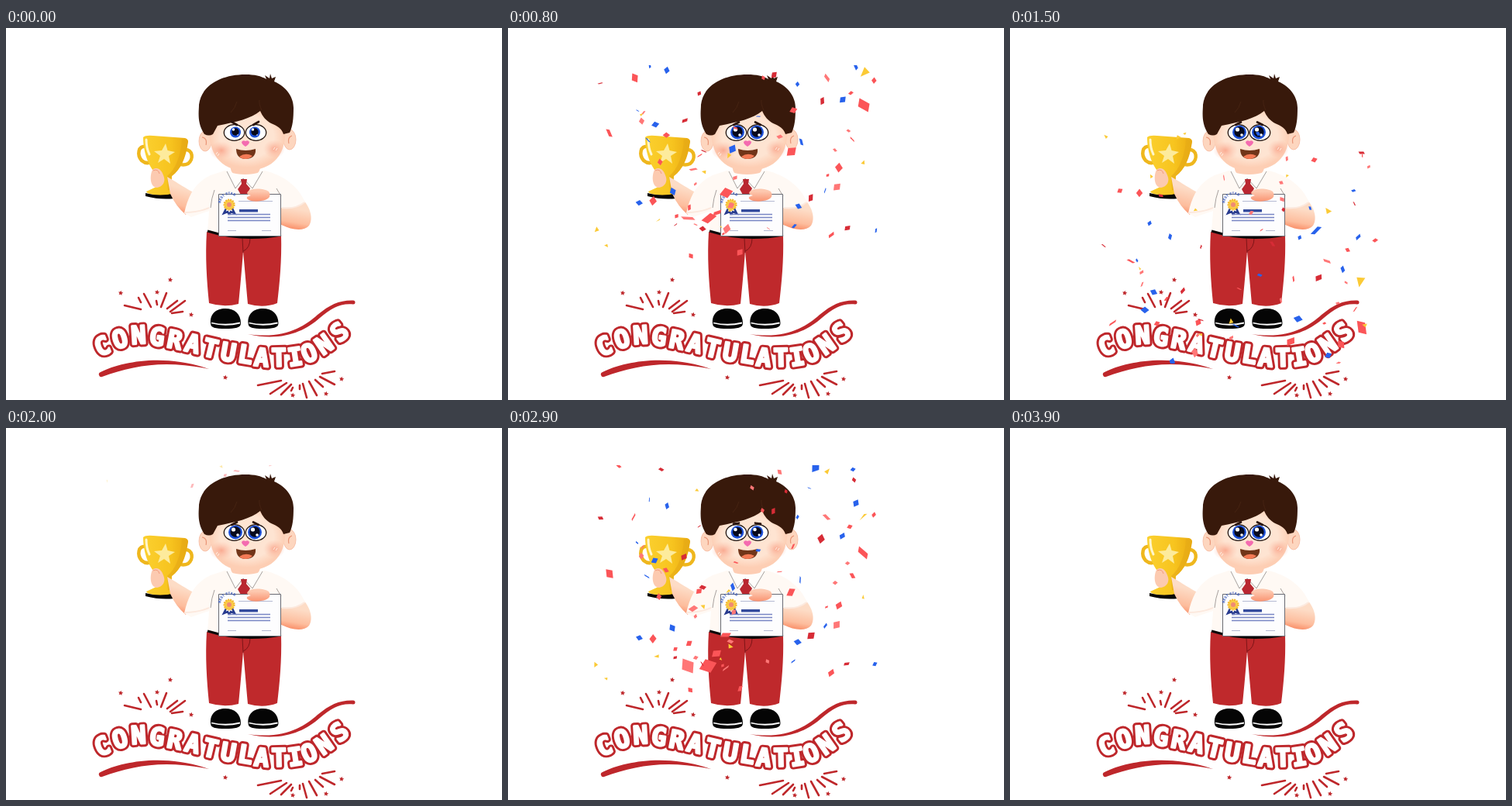
Animation of 640x480 px, one loop 4 s. Source, as an HTML page with a canvas:

```html
<!DOCTYPE html>
<html lang="en">
<head>
<meta charset="utf-8">
<title>Congratulations</title>
<style>
  html, body { margin: 0; width: 100%; height: 100%; overflow: hidden; background: #fff; }
  svg, canvas { position: absolute; left: 0; top: 0; width: 640px; height: 480px; }
  .ink { fill: #be272b; }
  .rays { fill: none; stroke: #be272b; stroke-width: 2.6; stroke-linecap: round; }
  .fine { fill: none; stroke: #9b9694; stroke-width: .9; }
  #letters text {
    font: bold 32px "DejaVu Sans Mono", "Noto Sans Mono", monospace;
    text-anchor: middle; stroke-linejoin: round;
  }
  .rim { fill: #be272b; stroke: #be272b; stroke-width: 8.5; }
  .core { fill: #fff; stroke: #fff; stroke-width: 2.6; }
</style>
</head>
<body>
<svg viewBox="0 0 640 480">
  <defs>
    <linearGradient id="gold"><stop offset="0" stop-color="#fbd02f"/><stop offset=".6" stop-color="#f7c41f"/><stop offset="1" stop-color="#eaaa12"/></linearGradient>
    <linearGradient id="arm" x1=".6" y1="0" x2=".4" y2="1"><stop offset=".3" stop-color="#fddcc6"/><stop offset=".75" stop-color="#fdbd9d"/><stop offset="1" stop-color="#f98a63"/></linearGradient>
    <linearGradient id="hand" x1="0" y1="0" x2="0" y2="1"><stop offset=".2" stop-color="#fdc9b0"/><stop offset="1" stop-color="#f99472"/></linearGradient>
    <radialGradient id="skin" cx=".5" cy=".45"><stop offset=".7" stop-color="#fee4d2"/><stop offset="1" stop-color="#fdceb4"/></radialGradient>
    <radialGradient id="blush"><stop offset="0" stop-color="#f99a80" stop-opacity=".75"/><stop offset="1" stop-color="#fbb9a0" stop-opacity="0"/></radialGradient>
    <path id="ring" d="M277 226a11.5 11.5 0 0 1 21-6"/>
  </defs>

  <!-- legs -->
  <g fill="#050505">
    <path id="shoe" d="M264 381C263 369 271 362 283 362S303 369 303 381C303 387 296 388 283 388S264 387 264 381Z"/>
    <use href="#shoe" x="48.5"/>
    <path d="M265 380.5Q283 385 302 380.5M313.500 380.500Q331.500 385 350.500 380.500" fill="none" stroke="#fff" stroke-width="1.8"/>
  </g>
  <path d="M259 263Q306 276 355 267C356 300 353 330 350 355Q332 362 312 356C310 335 308 310 306 288C304 315 302 335 300 356Q281 361 262 355C259 325 257 295 259 263Z" fill="#bf292c"/>
  <path d="M305 271L306 290M315 271Q315 284 306 288" fill="none" stroke="#7d1518"/>

  <!-- trophy -->
  <g fill="none" stroke="#efb71d" stroke-width="4.500">
    <path d="M181 153C170 151 169 164 175 171Q181 176 187 173M230 157C242 156 242 170 235 175Q229 178 222 175"/>
  </g>
  <path d="M177 141Q180 138 190 139L231 142Q235 143 235 147C232 168 226 182 214 191L213 205L218 211Q217 216 199 216Q182 215 181 211L196 204L198 192C184 182 177 160 177 141Z" fill="url(#gold)"/>
  <path d="M235 145C231 168 226 182 214 191L213 205L217 211L209 209L208 191C219 182 226 164 227 143Z" fill="#e7ab16" opacity=".65"/>
  <path d="M180 213Q199 218 218 213L217 220Q199 222 180 217Z" fill="#080604"/>
  <path d="M206 149L208.500 158L218 160L210 165L212 175L204 169L196 174L199 165L191 159L201 158Z" fill="#fdeb9c"/>
  <path d="M181 144C181 152 182 157 185 163" fill="none" stroke="#fff6cd" stroke-width="3" stroke-linecap="round"/>

  <!-- arms -->
  <path d="M208 192C222 200 232 207 245 214L232 241Q219 230 212 214Z" fill="url(#arm)"/>
  <path d="M189 183C195 178 201 183 203 190C207 198 202 205 195 206C186 206 185 191 189 183Z" fill="#fccab0"/>
  <path d="M190 184Q196 181 198 188" fill="none" stroke="#f39b7c"/>
  <path d="M350 222L384 222C394 234 396 247 391 255C384 263 367 261 352 252Z" fill="url(#arm)"/>

  <!-- shirt -->
  <path d="M282 184Q308 190 334 184C357 190 377 203 386 225Q374 234 355 232L355 267Q306 274 260 263L262 236L239 244L230 239C235 216 244 199 264 190Z" fill="#fff9f4"/>
  <path d="M231 238Q248 238 262 232M356 232Q374 234 385 225" fill="none" stroke="#fce9de" stroke-width="2"/>
  <path class="fine" d="M269 209Q265 220 264 232M349 207L355 217"/>
  <path d="M290 178H328Q329 190 308 195Q288 190 290 178Z" fill="#fdcdb3"/>
  <path d="M285 185L296 207L306 194L318 207L331 185Q309 193 285 185Z" fill="#fffdfa"/>
  <path class="fine" d="M285 185L296 207L306 194L318 207L331 185"/>
  <path d="M303 195H311L310 201L315 207L310 217H304L299 208L304 201Z" fill="#b92730"/>
  <path d="M260 262Q305 276 355 267" fill="none" stroke="#080808" stroke-width="3"/>

  <!-- certificate -->
  <g>
    <path d="M274.500 214.500H354.500V268.500H274.500Z" fill="#fdfdfe" stroke="#686a73"/>
    <path d="M284 233L281 239L286 237L288 241M292 233L295 239L290 237L288 241" fill="none" stroke="#283b8e" stroke-width="2.500"/>
    <circle cx="288" cy="228" r="6.500" fill="#f9cb47" stroke="#f5b92f" stroke-width="2.200" stroke-dasharray="2 1.100"/>
    <circle cx="288" cy="228" r="3" fill="#f08a75"/>
    <text font-family="Inter, sans-serif" font-size="4.500" font-weight="700" fill="#3557bb"><textPath href="#ring">BEST STAR</textPath></text>
    <path d="M301 234H325V237.500H301Z" fill="#344b9d"/>
    <path d="M286 240.500H341M286 244.500H341M286 248.500H341" stroke="#7785c3" stroke-width="1.300"/>
    <path d="M300 223.500H344M286 261.500H297M330 261.500H342" stroke="#b4b9d2"/>
  </g>
  <path d="M313 210C319 206 334 207 339 211C343 217 339 222 329 223C320 225 309 222 311 218L316 216Q308 214 313 210Z" fill="url(#hand)"/>

  <!-- head -->
  <g fill="#fdd6bf" stroke="#f6b89e" stroke-width=".8">
    <ellipse cx="257" cy="146" rx="8" ry="13"/>
    <ellipse cx="366" cy="144" rx="8" ry="13"/>
    <path d="M253 141Q260 142 258 151M369 139Q363 141 365 149" fill="none" stroke="#e99476" stroke-width="1.200"/>
  </g>
  <path d="M262 124C261 100 360 98 360 126C363 162 346 184 309 184C276 184 260 161 262 124Z" fill="url(#skin)"/>
  <ellipse cx="278" cy="158" rx="16" ry="12" fill="url(#blush)"/>
  <ellipse cx="346" cy="156" rx="14" ry="12" fill="url(#blush)"/>
  <path d="M271 163l2-3m0 5l2-3M345 157l2-3m1 4l2-3" stroke="#fff0e5"/>
  <path d="M256 137C246 122 249 108 249 99C252 73 279 60 309 60C321 60 329 62 336 66L334 61L340 65L341 59L343 65L348 63L346 69C364 77 371 91 371 103C371 117 370 127 366 135L358 137C356 130 350 126 342 123C335 119 331 114 328 107C316 117 298 121 273 126L267 137Q262 140 256 137Z" fill="#38190b"/>
  <path d="M290 109Q296 103 298 95M330 106Q326 98 327 93" fill="none" stroke="#4a2615" stroke-width=".8"/>
  <g id="eyes"></g>
  <path id="brows" fill="none" stroke="#2a1209" stroke-width="2.700" stroke-linecap="round"/>
  <path d="M304 147Q306 144 309 146Q312 144 314 147Q314 150 309 153Q304 150 304 147Z" fill="#f46bb0"/>
  <path d="M297 156Q309 160 322 156C323 165 317 169 309 169C301 169 297 164 297 156Z" fill="#713519"/>
  <path d="M301 166Q309 160 318 165Q314 169 309 169Q304 169 301 166Z" fill="#f47a55"/>

  <!-- lettering -->
  <path class="ink" d="M122 444C150 430 205 420 262 440C205 428 165 435 124 450A3 3 0 0 1 122 444ZM312 395C360 402 385 385 402 370C418 357 430 351 448 351.500A2.500 2.500 0 0 1 448 356.500C430 355 420 362 405 374C385 392 355 405 312 395Z"/>
  <path class="rays" d="M153 358L174 363M171 348L174 354M178 343L187 360M194 352L195 357M207 342L200 360M221 352L208 362M231 352L212 366M228 366L214 368"/>
  <path class="rays" d="M325 461L355 455M341 472L362 458M355 473L368 460M370 464L368 468M388 477L383 459M379 461L379 466M401 474L391 456M409 463L399 454M424 460L405 450M424 443L408 446"/>
  <g id="stars" class="ink"></g>
  <g id="letters"></g>
</svg>
<canvas id="confetti" width="640" height="480"></canvas>

<script>
const $ = id => document.getElementById(id);
const clamp = v => Math.max(0, Math.min(1, v));
const LOOP = 4000, STEP = 100, BURST = 1950;

// Lettering follows a wave; each letter leans with its neighbours.
const word = "CONGRATULATIONS";
const spots = [[124,410],[147,401],[171,396],[195,398],[218,402],[241,407],[264,413],[287,418],
  [309,421],[330,425],[352,425],[373,424],[391,419],[410,408],[430,392]];
const letter = kind => spots.map(([x, y], i) => {
  const a = spots[Math.max(0, i - 1)], b = spots[Math.min(spots.length - 1, i + 1)];
  const lean = Math.atan2(b[1] - a[1], b[0] - a[0]) * 180 / Math.PI;
  return `<text class="${kind}" transform="translate(${x} ${y}) rotate(${lean})" y="11.5">${word[i]}</text>`;
}).join("");
$("letters").innerHTML = letter("rim") + letter("core");

const starPath = (x, y, r) => "M" + Array.from({ length: 10 }, (_, i) => {
  const a = i * Math.PI / 5 - 1.4, d = i % 2 ? r * .48 : r;
  return `${x + d * Math.cos(a)} ${y + d * Math.sin(a)}`;
}).join("L") + "Z";
$("stars").innerHTML = [[148,342],[212,325],[195,341],[239,370],[283,451],[433,453],[413,472],[370,474]]
  .map(([x, y]) => `<path d="${starPath(x, y, 3.3)}"/>`).join("");

// Mood: 0 is determined, 1 is touched.
const moods = [[0,0],[300,0],[700,1],[2100,1],[2300,0],[2500,0],[2900,.65],[3100,1],[4000,1]];
function moodAt(t) {
  const i = moods.findIndex(m => m[0] > t), [t0, a] = moods[i - 1], [t1, b] = moods[i];
  return a + (b - a) * (t - t0) / (t1 - t0);
}

function eye(x, look, m) {
  const r = 7 + 2 * m, cx = x + look;
  return `<ellipse cx="${x}" cy="135" rx="13.2" ry="10.3" fill="#fff" stroke="#21140f" stroke-width="1.3"/>
    <circle cx="${cx}" cy="134.5" r="${r}" fill="#1d50d8"/>
    <circle cx="${cx}" cy="134" r="${r - 2.3}" fill="#07091c"/>
    <circle cx="${cx - 2.5}" cy="131" r="${1.7 + .9 * m}" fill="#fff"/>
    <circle cx="${cx + 3}" cy="138" r="${.8 + m}" fill="#fff"/>`;
}

function drawFace(t) {
  const m = moodAt(t), outer = 121 + 4 * m, inner = 125 - 3.5 * m;
  $("eyes").innerHTML = eye(294.5, 1.5, m) + eye(322.5, -1.5, m);
  $("brows").setAttribute("d", `M291 ${outer}L298 ${inner}M319 ${inner}L326 ${outer}`);
}

// Confetti: x, y, size, colour as they stand at time REF of a burst.
const REF = .95;
const colours = ["#fb5558", "#2862ec", "#fbca36", "#d72c36", "#ff7777"];
const large = [[162,115,9,0],[131,188,10,0],[239,233,9,4],[187,272,8,0],[258,307,15,0],[232,307,15,4],
  [269,291,10,0],[281,267,11,0],[281,310,9,4],[290,205,8,1],[365,212,10,0],[449,97,7,1],[459,113,13,2],
  [458,161,15,0],[411,115,9,4],[404,143,8,3],[391,268,8,3],[427,229,8,0],[424,254,8,4],[417,316,8,0],
  [193,295,7,2],[212,258,7,1],[368,301,6,1],[397,49,13,1],[412,57,8,2],[377,196,8,1]];

let seed = 41;
const rnd = () => (seed = seed * 16807 % 2147483647) / 2147483647;
const piece = (x, y, size, hue) => ({
  x, y, size, colour: colours[hue], triangle: hue === 2,
  speed: 230 + 12 * size, drift: (rnd() - .5) * 14 - 4,
  turn: rnd() * 6.3, spin: (rnd() - .5) * 6, flip: rnd() * 6.3, roll: 2 + rnd() * 5
});
const pieces = large.map(p => piece(...p));
for (let i = 0; i < 76; i++)
  pieces.push(piece(104 + rnd() * 376, -25 + rnd() * 365, 3.5 + rnd() * 3.5, Math.floor(rnd() * 5)));

const ctx = $("confetti").getContext("2d");
ctx.beginPath();
ctx.rect(98, 48, 385, 385);
ctx.clip();

function drawPiece(p, time) {
  const dt = time - REF, h = p.size / 2;
  const squash = Math.cos(p.flip + p.roll * time);
  ctx.save();
  ctx.translate(p.x + p.drift * dt, p.y + p.speed * dt);
  ctx.rotate(p.turn + p.spin * time);
  ctx.transform(1, 0, .25, Math.sign(squash) * Math.max(.18, Math.abs(squash)), 0, 0);
  ctx.fillStyle = p.colour;
  ctx.beginPath();
  ctx.moveTo(-h, h);
  if (p.triangle) ctx.lineTo(0, -h);
  else { ctx.lineTo(-h, -h); ctx.lineTo(h, -h); }
  ctx.lineTo(h, h);
  ctx.fill();
  ctx.restore();
}

function drawConfetti(t) {
  const phase = t % BURST;
  ctx.clearRect(0, 0, 640, 480);
  if (t >= 2 * BURST) return;
  ctx.globalAlpha = clamp(phase / 120) * clamp((1900 - phase) / 300);
  for (const p of pieces) drawPiece(p, phase / 1000);
}

const start = performance.now();
let shown = -1;
function tick() {
  const t = Math.floor((performance.now() - start) % LOOP / STEP) * STEP;
  if (t !== shown) {
    shown = t;
    drawFace(t);
    drawConfetti(t);
  }
  requestAnimationFrame(tick);
}
tick();
</script>
</body>
</html>
```
